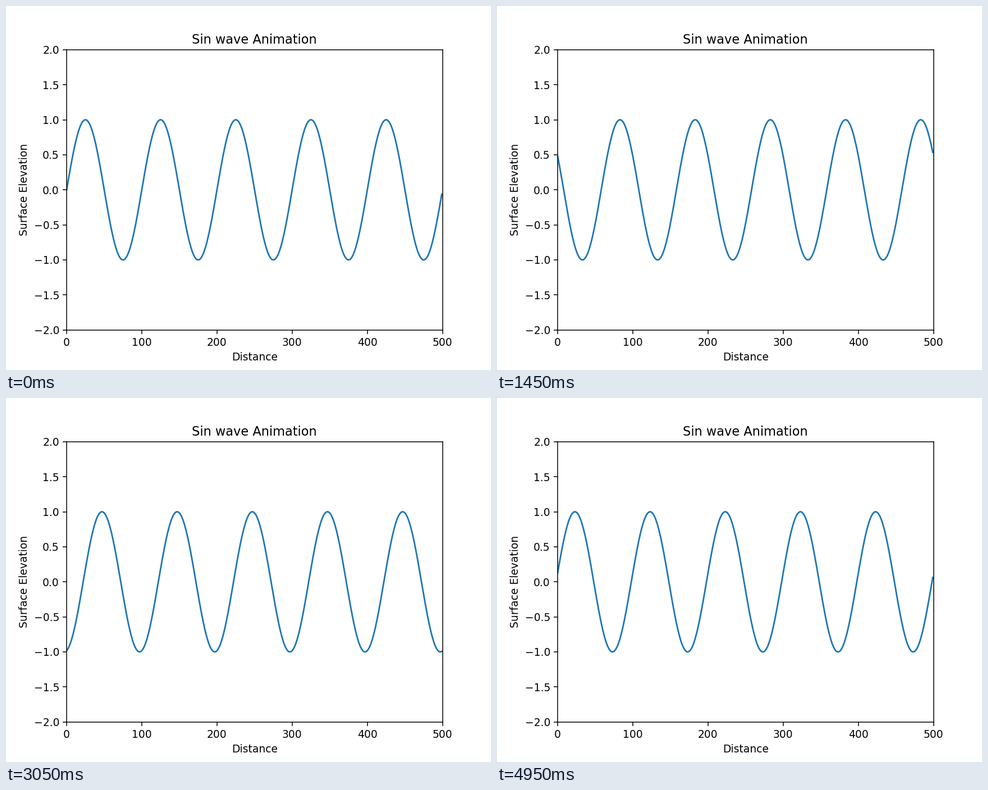
A matplotlib script for the animation above (5000 ms loop, 864 px wide and 648 px high).

```python
import numpy as np
import matplotlib.pyplot as plt
from matplotlib.animation import FuncAnimation

FRAMES = 100
INTERVAL = 50      # ms
WAVELENGTH = 100
STEP = 2           # distance travelled per frame

fig, ax = plt.subplots(figsize=(6.4, 4.8), dpi=135)
ax.set_xlim(0, 500)
ax.set_ylim(-2, 2)
ax.set_title("Sin wave Animation")
ax.set_xlabel("Distance")
ax.set_ylabel("Surface Elevation")

x = np.arange(500)


def elevation(frame):
    return np.sin(2 * np.pi * (x - STEP * frame) / WAVELENGTH)


line, = ax.plot(x, elevation(0), color="#1f77b4", lw=1.5)


def update(frame):
    line.set_ydata(elevation(frame))
    return line,


anim = FuncAnimation(fig, update, frames=FRAMES, interval=INTERVAL,
                     repeat=True, repeat_delay=0)
plt.show()
```
